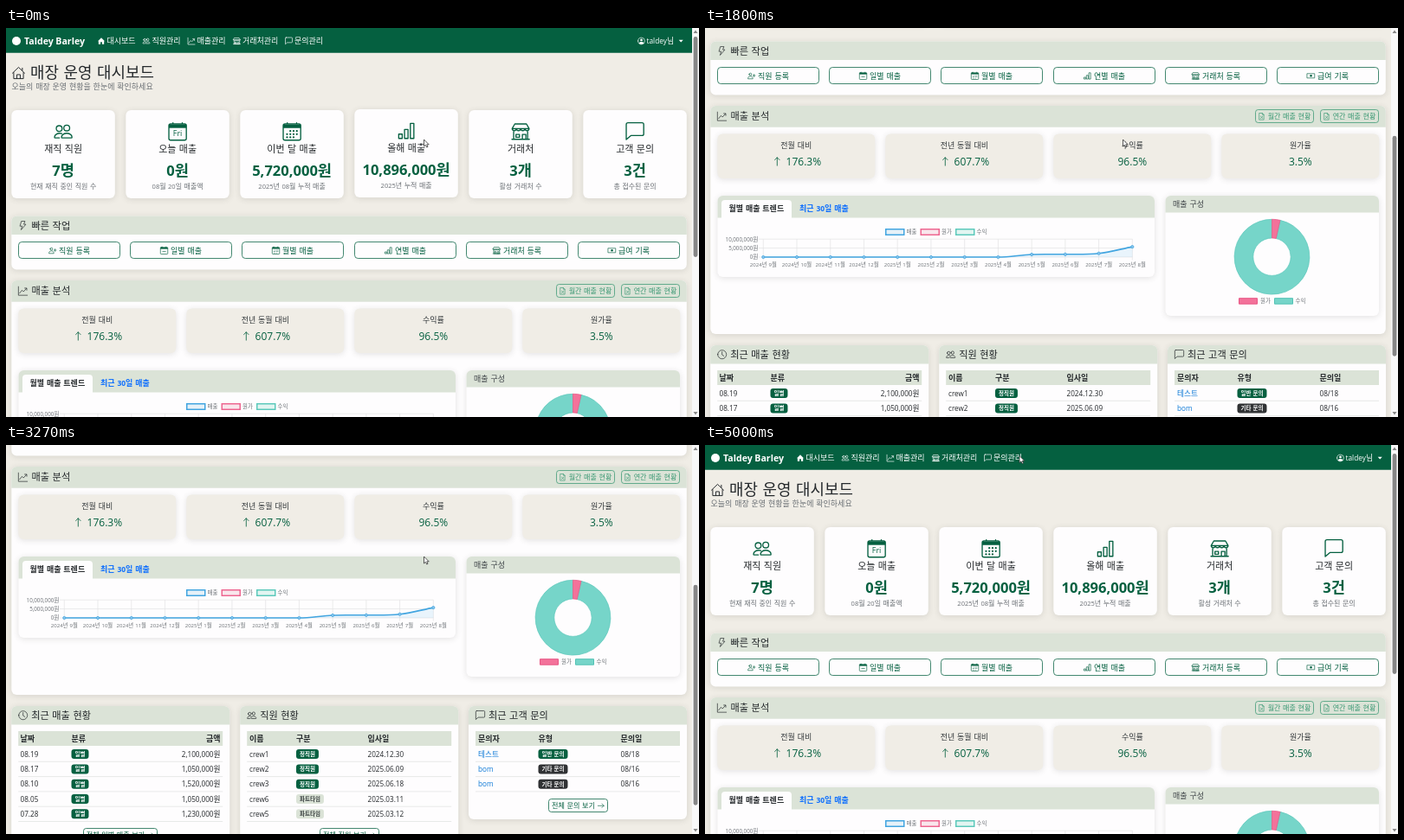
An HTML page with a canvas for the animation above (5070 ms loop, 800 by 450 pixels).

```html
<!DOCTYPE html>
<html lang="ko">
<head>
<meta charset="utf-8">
<title>매장 운영 대시보드</title>
<style>
html, body { margin: 0; width: 100%; height: 100%; overflow: hidden; background: #f0ede6; }
canvas { display: block; }
</style>
</head>
<body>
<canvas id="stage" width="800" height="450"></canvas>
<script>
const LOOP = 5070, STEP = 1000 / 15, PAGE_H = 758;
const GREEN = '#056040', SAGE = '#dbe3d7', BEIGE = '#f0ede6', WHITE = '#fefdfe';
const INK = '#24282b', GREY = '#6b7075', BLUE = '#0d6efd', MINT = '#3a9873';
const SKY = '#42a5e0', PINK = '#ee6690', TEAL = '#5cc9bb';

const circle = (x, y, r) => `M${x - r} ${y}a${r} ${r} 0 1 0 ${2 * r} 0a${r} ${r} 0 1 0 ${-2 * r} 0z`;

// Icons on a 16-unit grid: [stroked path, filled path]
const CAL = 'M2 1.5h12q1.5 0 1.5 1.5v11q0 1.5-1.5 1.5H2Q.5 15.5.5 14V3Q.5 1.5 2 1.5z M4 .5v1 M12 .5v1';
const CAL_TOP = 'M.5 2h15v3H.5z';
let dots = '';
for (let i = 0; i < 10; i++) {
  const n = i + 1;
  dots += circle(3.8 + (n % 4) * 2.8, 7.6 + Math.floor(n / 4) * 2.7, 0.85);
}
const ICONS = {
  house: ['M2.2 7.5V14.8H13.8V7.5 M.8 8.2L8 1.2L15.2 8.2 M12.5 5V2.2 M6 14.8V10h4v4.8', ''],
  home: ['', 'M8 1L15.5 8.3H14V15H9.7V10.5H6.3V15H2V8.3H.5z'],
  people: [circle(11, 5, 2.5) + circle(4.5, 5.5, 2.5) +
    'M7 13.5q-.5 0-.5-.5c0-1 1-3.5 4.5-3.5s4.5 2.5 4.5 3.5q0 .5-.5.5z M6.7 9.8Q6 9.5 5 9.5C1.5 9.5.5 12 .5 13q0 .5.5.5h3.7', ''],
  day: [CAL, CAL_TOP],
  dayMini: [CAL + 'M5 10h6', CAL_TOP],
  month: [CAL, CAL_TOP + dots],
  bars: ['M1.5 11h3v3.7h-3z M6.5 7h3v7.7h-3z M11.5 1.8h3v12.9h-3z', ''],
  shop: ['M3 1.5h10l2.3 4H.7z M.7 5.5a1.8 1.8 0 0 0 3.65 0a1.8 1.8 0 0 0 3.65 0a1.8 1.8 0 0 0 3.65 0a1.8 1.8 0 0 0 3.65 0 M2 8v6.7h12V8 M9.5 14.7v-4.2h3v4.2 M4 10.5h3v2.5H4z M.5 14.7h15', ''],
  chat: ['M2 .5h12q1.5 0 1.5 1.5v8q0 1.5-1.5 1.5H4.5L.5 15V2Q.5.5 2 .5z', ''],
  bolt: ['M6 .8h5.5L9.5 6h3.5L5 15.2 6.8 9H3.6z', ''],
  graph: ['M.5 1v14.5h15 M2.5 12l4-5 2.5 2.5 5-5.5 M11 3.5h3.5v3.5', ''],
  join: [circle(6, 5, 2.5) + 'M1 13.5c0-3 2-4.5 5-4.5s5 1.5 5 4.5z M13.5 5v5 M11 7.5h5', ''],
  cash: ['M.5 3.5h15v9H.5z', circle(8, 8, 2.2)],
  file: ['M3 .5h6.5L13 4v11.5H3z M9.5 .5V4H13 M5.5 7.5l5 5 M10.5 7.5l-5 5', ''],
  clock: [circle(8, 8, 7.3) + 'M8 3.5V8.5L11 10.5', ''],
  account: [circle(8, 8, 7.3), circle(8, 6, 2.6) + 'M2.8 12.8C4 10.5 6 10 8 10s4 .5 5.2 2.8Q11 15.2 8 15.2T2.8 12.8z'],
  up: ['M8 15V1.5 M4 5.5L8 1.5l4 4', ''],
  right: ['M1 8h13.5 M10 3.5L14.5 8 10 12.5', '']
};

let g;

function icon(name, cx, cy, size, color, weight = 1) {
  const [line, solid] = ICONS[name], k = size / 16;
  g.save();
  g.translate(cx - size / 2, cy - size / 2);
  g.scale(k, k);
  g.strokeStyle = g.fillStyle = color;
  g.lineWidth = Math.max(weight, 0.65 / k);
  g.lineJoin = g.lineCap = 'round';
  if (line) g.stroke(new Path2D(line));
  if (solid) g.fill(new Path2D(solid));
  g.restore();
}

function runs(str, size, weight) {
  g.wordSpacing = size * 0.09 + 'px';
  return str.match(/[\uac00-\ud7a3 ]+|[^\uac00-\ud7a3 ]+/g).map(s => {
    const font = /[\uac00-\ud7a3 ]/.test(s)
      ? `${weight} ${size}px "Noto Sans CJK KR","Noto Sans CJK JP",sans-serif`
      : `${weight} ${size * 0.94}px "Open Sans","Noto Sans",sans-serif`;
    g.font = font;
    return { s, font, w: g.measureText(s).width };
  });
}
const width = (str, size, weight = 400) => runs(str, size, weight).reduce((sum, r) => sum + r.w, 0);

// y is the middle of the line
function text(str, x, y, size, color = INK, weight = 400, align = 0) {
  const parts = runs(str, size, weight);
  x -= align * parts.reduce((sum, r) => sum + r.w, 0);
  g.fillStyle = color;
  for (const r of parts) {
    g.font = r.font;
    g.fillText(r.s, x, y + size * 0.36);
    x += r.w;
  }
}
const mid = (str, x, y, size, color, weight) => text(str, x, y, size, color, weight, 0.5);

function box(x, y, w, h, r, fill, stroke, lw = 0.9) {
  g.beginPath();
  g.roundRect(x, y, w, h, r);
  if (fill) { g.fillStyle = fill; g.fill(); }
  if (stroke) { g.strokeStyle = stroke; g.lineWidth = lw; g.stroke(); }
}

function card(x, y, w, h, fill = WHITE) {
  g.save();
  g.shadowColor = 'rgba(60,60,50,.14)';
  g.shadowBlur = 7;
  g.shadowOffsetY = 1.2;
  box(x, y, w, h, 6, fill);
  g.restore();
}

function panel(x, y, w, h, head) {
  card(x, y, w, h);
  box(x, y, w, head, [6, 6, 0, 0], SAGE);
}

function line(x1, y1, x2, y2, color, lw = 0.7) {
  g.beginPath();
  g.moveTo(x1, y1);
  g.lineTo(x2, y2);
  g.strokeStyle = color;
  g.lineWidth = lw;
  g.stroke();
}

// Snapped to pixel centres so the outline stays one pixel thin
function button(x, y, w, h, label, size, color, name, after) {
  x = Math.floor(x) + 0.5;
  y = Math.floor(y) + 0.5;
  box(x, y, w, h, h / 5, null, color, 0.75);
  const tw = width(label, size), cy = y + h / 2 + 0.3;
  const left = x + (w - tw - size - 3) / 2;
  icon(name, after ? left + tw + 3 + size / 2 : left + size / 2, cy, size, color);
  text(label, after ? left : left + size + 3, cy, size, color);
}

function navbar() {
  box(0, 0, 792, 28.7, 0, GREEN);
  g.beginPath();
  g.arc(12, 15, 5, 0, 7);
  g.fillStyle = '#fff';
  g.fill();
  text('Taldey Barley', 21, 15, 11.3, '#fff', 700);
  [['home', 110, '대시보드'], ['people', 162, '직원관리'], ['graph', 214, '매출관리'],
   ['shop', 266.5, '거래처관리'], ['chat', 326.5, '문의관리']].forEach(([name, x, label]) => {
    icon(name, x, 15, 8.5, '#fff');
    text(label, x + 6.5, 15, 9, '#fff');
  });
  icon('account', 733.5, 15, 8.5, '#fff');
  text('taldey님', 771, 15, 8.8, '#fff', 400, 1);
  g.fillStyle = '#fff';
  g.fill(new Path2D('M776.7 13.7h5l-2.5 2.7z'));
}

function summary(lifted) {
  [['people', '재직 직원', '7명', '현재 재직 중인 직원 수'],
   ['day', '오늘 매출', '0원', '08월 20일 매출액'],
   ['month', '이번 달 매출', '5,720,000원', '2025년 08월 누적 매출'],
   ['bars', '올해 매출', '10,896,000원', '2025년 누적 매출'],
   ['shop', '거래처', '3개', '활성 거래처 수'],
   ['chat', '고객 문의', '3건', '총 접수된 문의']].forEach(([name, title, value, note], i) => {
    const x = 6.3 + i * 132, c = x + 59.8, y = lifted && i === 3 ? 94 : 95;
    card(x, y, 119.5, 102);
    icon(name, c, y + 24.7, 21.5, GREEN);
    if (name === 'day') mid('Fri', c, y + 26.5, 9.5, GREEN);
    mid(title, c, y + 45.3, 11);
    mid(value, c, y + 69.7, 17.6, GREEN, 700);
    mid(note, c, y + 87.7, 8, GREY);
  });
}

function actions() {
  panel(6.3, 217.5, 779.5, 62, 21.5);
  icon('bolt', 19.5, 228.5, 11, INK);
  text('빠른 작업', 29.5, 228.5, 11.2);
  [['join', '직원 등록'], ['dayMini', '일별 매출'], ['month', '월별 매출'],
   ['bars', '연별 매출'], ['shop', '거래처 등록'], ['cash', '급여 기록']].forEach(([name, label], i) =>
    button(14.5 + i * 129.2, 247.5, 117, 19, label, 9, GREEN, name));
}

function keyBox(x, y, label, color, fill) {
  box(x + 0.75, y - 3.25, 21, 6.5, 0, fill, color, 1.5);
  text(label, x + 24.5, y, 6.4, GREY);
}

function trend() {
  panel(14.5, 396, 504.5, 94, 25.5);
  box(19, 401, 81, 21, [4, 4, 0, 0], WHITE);
  text('월별 매출 트렌드', 27.5, 410.7, 9, INK, 700);
  text('최근 30일 매출', 109, 410.7, 9, BLUE, 700);
  keyBox(208, 438, '매출', SKY, '#e6f1f8');
  keyBox(248.5, 438, '원가', PINK, '#f9e6ec');
  keyBox(289, 438, '수익', TEAL, '#e2f5f1');

  const x0 = 67.3, dx = 38.73, base = 467, perM = 2.08, grid = '#e3e3e4';
  ['10,000,000원', '5,000,000원', '0원'].forEach((label, i) => {
    const y = base - (2 - i) * 5 * perM;
    line(62, y, x0 + 11 * dx, y, grid);
    text(label, 61.5, y, 6.7, GREY, 400, 1);
  });
  const sales = [0, 0, 0, 0, 0, 0, 0, 0, 1.45, 1.55, 2.05, 5.72];
  const pts = sales.map((v, i) => [x0 + i * dx, base - v * perM]);
  pts.forEach(([x], i) => {
    line(x, base - 10 * perM, x, base + 3.5, grid);
    const m = (i + 8) % 12 + 1;
    mid(`${i < 4 ? 2024 : 2025}년 ${m}월`, x, 476, 6.4, GREY);
  });
  const slope = i => i === 0 || i === 11 || sales[i] === 0 ? 0 : (pts[i + 1][1] - pts[i - 1][1]) / 2;
  const trace = () => {
    g.beginPath();
    g.moveTo(...pts[0]);
    for (let i = 1; i < pts.length; i++) {
      const [ax, ay] = pts[i - 1], [bx, by] = pts[i];
      const end = i === 11 ? by - ay : slope(i);
      g.bezierCurveTo(ax + dx / 3, ay + slope(i - 1) / 3, bx - dx / 3, by - end / 3, bx, by);
    }
  };
  trace();
  g.lineTo(pts[11][0], base);
  g.lineTo(x0, base);
  g.fillStyle = 'rgba(54,162,235,.1)';
  g.fill();
  trace();
  g.strokeStyle = SKY;
  g.lineWidth = 1.6;
  g.stroke();
  for (const [x, y] of pts) {
    g.beginPath();
    g.arc(x, y, 1.6, 0, 7);
    g.fillStyle = '#8cc7ec';
    g.fill();
    g.lineWidth = 0.8;
    g.stroke();
  }
}

function slice(from, to, fill, edge) {
  const a = p => p * 2 * Math.PI - Math.PI / 2;
  g.beginPath();
  g.arc(654.5, 466.7, 43.4, a(from), a(to));
  g.arc(654.5, 466.7, 21.7, a(to), a(from), true);
  g.closePath();
  g.fillStyle = fill;
  g.fill();
  g.strokeStyle = edge;
  g.lineWidth = 0.7;
  g.stroke();
}

function analysis() {
  panel(6.3, 292, 779.5, 264, 24.7);
  icon('graph', 19.5, 304, 11, INK);
  text('매출 분석', 29.5, 304, 11.2);
  button(635.5, 296.5, 67, 15, '월간 매출 현황', 8.1, MINT, 'file');
  button(710, 296.5, 67, 15, '연간 매출 현황', 8.1, MINT, 'file');
  [['전월 대비', '176.3%', 1], ['전년 동월 대비', '607.7%', 1], ['수익률', '96.5%'], ['원가율', '3.5%']]
    .forEach(([label, value, rise], i) => {
      const x = 14.3 + i * 194, c = x + 91;
      card(x, 324.5, 182, 51.5, BEIGE);
      mid(label, c, 338, 9, '#33383b');
      if (rise) icon('up', c - 22, 356.3, 11, GREEN, 1.2);
      mid(value, rise ? c + 8.5 : c, 356.2, 12.8, GREEN);
    });
  trend();
  panel(531.5, 396, 246.5, 139, 19.5);
  text('매출 구성', 540, 405.3, 9, '#40464a');
  slice(0.035, 1, '#76d5c9', '#5cc8bb');
  slice(0, 0.035, '#f3729a', '#e85685');
  box(616.5, 514.7, 21, 6.5, 0, '#f3729a', '#e85685', 1);
  text('원가', 641, 518, 6.4, GREY);
  box(657.5, 514.7, 21, 6.5, 0, '#76d5c9', '#52c2b4', 1);
  text('수익', 681.5, 518, 6.4, GREY);
}

function badge(label, x, y, kind) {
  const [fill, color] = { g: [GREEN, '#fff'], s: [SAGE, '#3a4040'], d: ['#303234', '#fff'] }[kind];
  const w = width(label, 6.5, 700) + 8;
  box(x, y - 5.5, w, 11, 3, fill);
  text(label, x + 4, y, 6.5, color, 700);
}

// A cell is a plain string, or [label, badge kind]
function table(x, h, name, title, cols, heads, rows, more, bw, opt = {}) {
  const top = 569;
  panel(x, top, 252, h, 21.5);
  icon(name, x + 13.5, top + 10.7, 11, INK);
  text(title, x + 23, top + 10.7, 11.2);
  box(x + 8, top + 29, 236, 17, 0, SAGE);
  const align = i => (i === 2 && opt.right ? 1 : 0);
  heads.forEach((s, i) => text(s, cols[i], top + 37.7, 9, INK, 700, align(i)));
  rows.forEach((row, r) => {
    const y = top + 55.6 + r * 17.3;
    row.forEach((cell, i) => {
      if (Array.isArray(cell)) badge(cell[0], cols[i], y, cell[1]);
      else text(cell, cols[i], y, 8.7, opt.link && i === 0 ? '#0b78d6' : INK, 400, align(i));
    });
    line(x + 8, y + 8.7, x + 244, y + 8.7, '#dfe1e0');
  });
  button(x + 126 - bw / 2, top + h - 24, bw, 15, more, 8.1, GREEN, 'right', true);
}

function lists() {
  const daily = ['일별', 'g'], full = ['정직원', 'g'], part = ['파트타임', 's'], other = ['기타 문의', 'd'];
  table(6.2, 165, 'clock', '최근 매출 현황', [16.5, 75.5, 247.5], ['날짜', '분류', '금액'], [
    ['08.19', daily, '2,100,000원'], ['08.17', daily, '1,050,000원'], ['08.10', daily, '1,520,000원'],
    ['08.05', daily, '1,050,000원'], ['07.28', daily, '1,230,000원']
  ], '전체 일별 매출 보기', 85, { right: true });
  table(270.2, 165, 'people', '직원 현황', [281, 335, 417.5], ['이름', '구분', '입사일'], [
    ['crew1', full, '2024.12.30'], ['crew2', full, '2025.06.09'], ['crew3', full, '2025.06.18'],
    ['crew6', part, '2025.03.11'], ['crew5', part, '2025.03.12']
  ], '전체 직원 보기', 68);
  table(534, 131, 'chat', '최근 고객 문의', [545, 614.5, 709.5], ['문의자', '유형', '문의일'], [
    ['테스트', ['일반 문의', 'g'], '08/18'], ['bom', other, '08/16'], ['bom', other, '08/16']
  ], '전체 문의 보기', 68, { link: true });
}

function renderPage(lifted) {
  const c = document.createElement('canvas');
  c.width = 800;
  c.height = PAGE_H;
  g = c.getContext('2d');
  box(0, 0, 800, PAGE_H, 0, BEIGE);
  navbar();
  icon('house', 14.5, 52, 15.5, INK);
  text('매장 운영 대시보드', 28, 52, 17.9);
  text('오늘의 매장 운영 현황을 한눈에 확인하세요', 6.5, 67.8, 9, GREY);
  summary(lifted);
  actions();
  analysis();
  lists();
  return c;
}

// Smooth monotone curve through [time, value] keys
function curve(keys, t) {
  const last = keys.length - 1;
  if (t <= keys[0][0]) return keys[0][1];
  if (t >= keys[last][0]) return keys[last][1];
  const rate = i => (keys[i + 1][1] - keys[i][1]) / (keys[i + 1][0] - keys[i][0]);
  const tangent = i => {
    if (i === 0 || i === last) return 0;
    const a = rate(i - 1), b = rate(i);
    return a * b > 0 ? 2 * a * b / (a + b) : 0;
  };
  let i = 0;
  while (t >= keys[i + 1][0]) i++;
  const [ta, a] = keys[i], [tb, b] = keys[i + 1];
  const d = tb - ta, u = (t - ta) / d, v = 1 - u;
  return v * v * (1 + 2 * u) * a + u * u * (3 - 2 * u) * b
    + d * u * v * (v * tangent(i) - u * tangent(i + 1));
}

const SCROLL = [[0, 0], [300, 0.6], [530, 3], [800, 10], [1100, 35], [1400, 81], [1750, 185], [2067, 292],
  [2200, 306], [2400, 308], [2700, 305], [3000, 292], [3267, 267], [3867, 95], [4130, 20], [4330, 0]];
const MOUSE_X = [[4330, 482.5], [4600, 440], [4800, 385], [4970, 363]];
const MOUSE_Y = [[4330, 129], [4600, 45], [4800, 9], [4970, 12.5]];

const view = document.getElementById('stage').getContext('2d');
const hovered = renderPage(true), plain = renderPage(false);
const arrow = new Path2D('M0 0V8L1.9 6.3 3.2 9 4.5 8.4 3.3 5.8H5.7z');

function draw(now) {
  const t = Math.floor((now % LOOP + 5) / STEP) * STEP;
  const y = Math.round(curve(SCROLL, t));
  g = view;
  g.drawImage(t < 4480 ? hovered : plain, 0, -y);

  box(792, 0, 8, 450, 0, '#f8f8f8');
  box(793.6, 10 + y * 0.568, 4.8, 255, 2.4, '#868686');
  g.fill(new Path2D('M793.5 6L796 2.5 798.5 6z M793.5 444L796 447.5 798.5 444z'));

  g.save();
  g.translate(curve(MOUSE_X, t), curve(MOUSE_Y, t));
  g.fillStyle = '#fff';
  g.strokeStyle = '#333';
  g.lineWidth = 0.8;
  g.fill(arrow);
  g.stroke(arrow);
  g.restore();
}

const start = performance.now();
function tick() {
  draw(performance.now() - start);
  requestAnimationFrame(tick);
}
tick();
</script>
</body>
</html>
```
